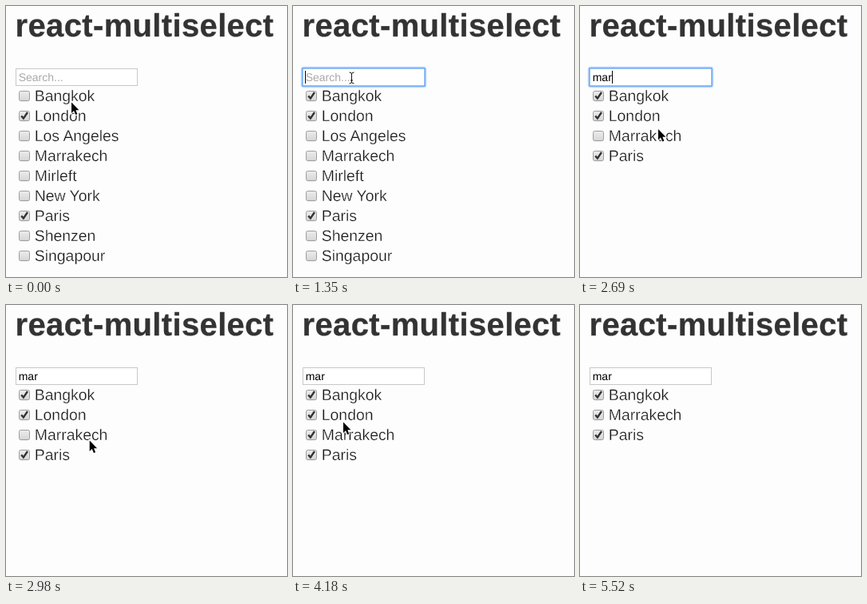
Animation of 352x339 px, one loop 5770 ms. Source, as an HTML page:

```html
<!DOCTYPE html>
<html lang="en">
<head>
<meta charset="utf-8">
<title>react-multiselect</title>
<style>
  html, body { margin: 0; width: 100%; height: 100%; overflow: hidden; background: #fdfdfd; }
  svg { display: block; width: 352px; height: 339px; font-family: "Liberation Sans", Arial, sans-serif;
    text-rendering: geometricPrecision; }
  .title { font-size: 40px; font-weight: bold; letter-spacing: .35px; fill: #333; stroke: #333; stroke-width: .3px; }
  .field { font-size: 14px; fill: #000; }
  .hint { fill: #a9a9a9; }
  /* a thin background stroke lightens the letter weight */
  .item { font-size: 19.4px; fill: #141414; stroke: #fdfdfd; stroke-width: .35px; }
</style>
</head>
<body>
<svg viewBox="0 0 352 339">
  <defs>
    <linearGradient id="face" x2="0" y2="1">
      <stop stop-color="#ececec"/><stop offset="1" stop-color="#d6d6d6"/>
    </linearGradient>
    <linearGradient id="pressed" x2="0" y2="1">
      <stop stop-color="#cecece"/><stop offset="1" stop-color="#bebebe"/>
    </linearGradient>
  </defs>
  <rect width="352" height="339" fill="#fdfdfd"/>
  <text class="title" x="11.6" y="38.4">react-multiselect</text>
  <g id="search"></g>
  <g id="list"></g>
  <g id="pointer"></g>
</svg>
<script>
const LOOP = 5770;
const CITIES = ['Bangkok', 'London', 'Los Angeles', 'Marrakech', 'Mirleft',
  'New York', 'Paris', 'Shenzen', 'Singapour'];

// Each step changes part of the state from its time on.
const steps = [
  { t: 0, pos: [82, 120.5], beam: false, focus: false, query: '', press: '', on: ['London', 'Paris'] },
  { t: 600, press: 'Bangkok' },
  { t: 750, press: '', on: ['Bangkok', 'London', 'Paris'] },
  { t: 1050, pos: [79, 107] },
  { t: 1200, pos: [73.5, 90], beam: true },
  { t: 1350, focus: true },
  { t: 1950, query: 'ma' },
  { t: 2240, query: 'mar' },
  { t: 2390, pos: [76, 94] },
  { t: 2530, pos: [86, 121], beam: false },
  { t: 2680, pos: [98, 154] },
  { t: 2830, pos: [104.7, 169.5] },
  { t: 2980, focus: false },
  { t: 3130, pos: [103, 172] },
  { t: 3580, press: 'Marrakech' },
  { t: 3730, press: '', on: ['Bangkok', 'London', 'Marrakech', 'Paris'] },
  { t: 3880, pos: [92, 192] },
  { t: 4030, pos: [72, 176] },
  { t: 4180, pos: [63, 146.5] },
  { t: 4330, pos: [58, 139] },
  { t: 4480, pos: [56, 135.5] },
  { t: 4630, on: ['Bangkok', 'Marrakech', 'Paris'] },
  { t: 4930, pos: [68, 152] },
  { t: 5080, pos: [118, 200] },
  { t: 5230, pos: [205, 266] },
  { t: 5370, pos: [309, 328] },
  { t: 5520, pos: null }
];

const states = [];
steps.forEach((step, i) => states.push({ ...states[i - 1], ...step }));

const $ = id => document.getElementById(id);

function searchBox({ focus, query }) {
  const frame = focus
    ? `<rect x="9.5" y="75.5" width="158" height="27" rx="4" fill="#d9e8fc"/>
       <rect x="10.5" y="76.5" width="156" height="25" rx="3" fill="#9cc5fa"/>
       <rect x="12" y="78" width="153" height="22" fill="#fff" stroke="#6ca8f3" stroke-width="1.4"/>`
    : '<rect x="12.5" y="78.5" width="152" height="21" fill="#fff" stroke="#c8c8c8"/>';
  const text = `<text class="field${query ? '' : ' hint'}" x="15.7" y="94">${query || 'Search...'}</text>`;
  return frame + text;
}

function caret(query) {
  const label = $('search').querySelector('text');
  const x = 15.5 + (query ? Math.ceil(label.getComputedTextLength()) : 0);
  return `<path d="M${x} 81V97" stroke="#000"/>`;
}

function row(city, i, { on, press }) {
  const tick = on.includes(city)
    ? '<path d="M19.2 112.4L21.9 115.6L27 108" fill="none" stroke="#333" stroke-width="2.4"/>' : '';
  return `<g transform="translate(0 ${i * 25})">
    <rect x="16.5" y="107.5" width="13" height="12" rx="2.5" fill="#e2e2e2"/>
    <rect x="16.5" y="106.5" width="13" height="12" rx="2" fill="url(#${press === city ? 'pressed' : 'face'})" stroke="#9e9e9e"/>
    ${tick}<text class="item" x="35.8" y="119">${city}</text></g>`;
}

function pointer({ pos, beam }) {
  if (!pos) return '';
  const shape = beam
    ? '<path d="M-3 -7Q0 -7 0 -5Q0 -7 3 -7M0 -5V5M-3 7Q0 7 0 5Q0 7 3 7M-1.5 3H1.5" fill="none" stroke="#111"/>'
    : '<path d="M0 0V13.4L3 10.6L5.2 15.6L7.4 14.7L5.3 9.8H9.4Z" fill="#000" stroke="#fff" stroke-width="2" paint-order="stroke"/>';
  return `<g transform="translate(${pos})">${shape}</g>`;
}

function draw(s) {
  const shown = CITIES.filter(c => s.on.includes(c) || c.toLowerCase().includes(s.query));
  $('search').innerHTML = searchBox(s);
  if (s.focus) $('search').innerHTML += caret(s.query);
  $('list').innerHTML = shown.map((c, i) => row(c, i, s)).join('');
  $('pointer').innerHTML = pointer(s);
}

let current;
const start = performance.now();
function tick() {
  const t = (performance.now() - start) % LOOP;
  const state = states.filter(s => s.t <= t).pop();
  if (state !== current) draw(current = state);
  requestAnimationFrame(tick);
}
tick();
</script>
</body>
</html>
```
